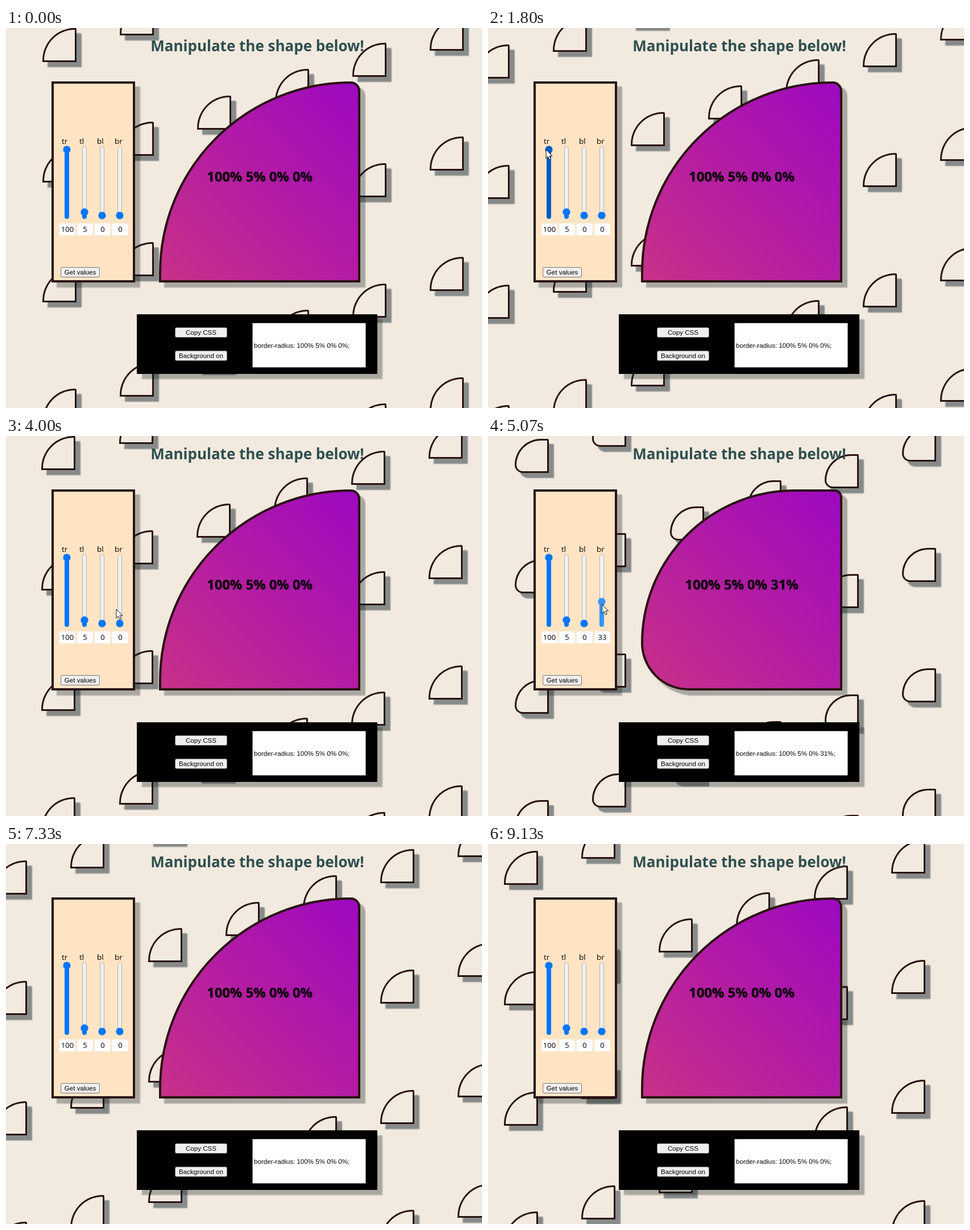
Write an HTML page that moves like this. It is 837x669 px and loops after 9.19 s.

```html
<!DOCTYPE html>
<html lang="en">
<head>
<meta charset="utf-8">
<title>Manipulate the shape below!</title>
<style>
  html, body { margin: 0; width: 100%; height: 100%; overflow: hidden; background: #f2eadf; }
  #stage { position: relative; width: 837px; height: 669px; overflow: hidden; background: #f2eadf; }
  #stage div { position: absolute; box-sizing: border-box; }
  .tile { left: 0; top: 0; width: 60px; height: 60px; border: 3px solid #2a1212;
    background: #f2eadf; box-shadow: 9px 9px 2px #868b89; }
  .box { box-shadow: 9px 9px 2px rgba(20, 25, 30, .32); }
  #panel { left: 80px; top: 94px; width: 147px; height: 354px; border: 4px solid #2a1212; background: #ffe4c4; }
  #shape { left: 269px; top: 94px; width: 354px; height: 354px; border: 4px solid #2a1212;
    background: linear-gradient(45deg, #c93187, #9d08c1) border-box; }
  #console { left: 230px; top: 504px; width: 423px; height: 105px; background: #000; }
  svg { position: absolute; left: 0; top: 0; }
  .ui { font-family: "Open Sans", "Noto Sans", sans-serif; }
  .form { font: 11.6px "Liberation Sans", Arial, sans-serif; }
  .bold { font-weight: 700; }
  .mid { text-anchor: middle; }
  #readout { text-shadow: 1px 1px 2px rgba(0, 0, 0, .35); }
</style>
</head>
<body>
<div id="stage">
  <div id="tiles"></div>
  <div id="panel" class="box"></div>
  <div id="shape" class="box"></div>
  <div id="console" class="box"></div>
  <svg id="art" width="837" height="669" viewBox="0 0 837 669"></svg>
</div>
<script>
const LOOP = 9190, FPS = 15, LAST = 137;
const COL = { x: 136.2, y: 46.4 }, ROW = 211.8;
const COLS = 7, ROWS = 5;
const BLUE = '#0075ff', HOVER = '#005cc8', ACTIVE = '#3793ff';
const PX = 1.16; // slider pixels per percent

// Each slider rests at a value; two of them are dragged away and back.
const specs = [
  { name: 'tr', rest: 100, by: -47, from: 1.8, to: 3.6 },
  { name: 'tl', rest: 5 },
  { name: 'bl', rest: 0 },
  { name: 'br', rest: 0, by: 37, from: 4.2, to: 6.4 }
];

const $ = id => document.getElementById(id);
const art = $('art');
const mod = (a, n) => (a % n + n) % n;
const unit = (t, from, to) => Math.min(1, Math.max(0, (t - from) / (to - from)));

function ease(t, from, to) {
  const u = unit(t, from, to);
  return u * u * (3 - 2 * u);
}

const offset = (s, t) => s.by ? s.by * Math.sin(Math.PI * unit(t, s.from, s.to)) ** 2 : 0;
const values = t => specs.map(s => Math.round(s.rest + offset(s, t)));

// Two columns per second, with a slight slow wobble.
const drift = t => 2 * t + .031 * Math.sin(2 * Math.PI * t * 1000 / LOOP);

function tint(s, t) {
  if (!s.by || t < s.from - .1 || t > s.to) return BLUE;
  return t > s.from + .05 ? ACTIVE : HOVER;
}

function pointer(t) {
  const enter = ease(t, 1.1, 1.7), cross = ease(t, 3.6, 4), leave = ease(t, 6.4, 7);
  const x = -20 + 122 * enter + 5 * ease(t, 1.8, 2.6) + 87 * cross + 14 * ease(t, 4.2, 6) - 240 * leave;
  const y = 300 - 86 * enter + 91 * cross + 30 * ease(t, 4, 4.2) + 65 * leave;
  const dragged = specs.reduce((sum, s) => sum + offset(s, t), 0);
  return `translate(${x} ${y - PX * dragged})`;
}

function add(tag, attrs, text) {
  const el = document.createElementNS('http://www.w3.org/2000/svg', tag);
  for (const k in attrs) el.setAttribute(k, attrs[k]);
  if (text) el.textContent = text;
  art.appendChild(el);
  return el;
}

const label = (x, y, cls, size, text, fill = '#000') =>
  add('text', { x, y, class: cls, style: size ? `font-size:${size}px` : '', fill }, text);

function button(x, y, w, text) {
  add('rect', { x: x + .5, y: y + .5, width: w - 1, height: 17, rx: 2.5, fill: '#efefef', stroke: '#767676' });
  label(x + w / 2, y + 13, 'form mid', 0, text);
}

label(442, 41, 'ui bold mid', 26, 'Manipulate the shape below!', '#2f4f4f');
const readout = label(446, 270, 'ui bold mid', 23.8, '');
readout.id = 'readout';

const sliders = specs.map(({ name }, i) => {
  const x = 107 + 31 * i;
  label(x - 9, 204, 'ui', 13.5, name);
  const rail = add('rect', { x: x - 3.5, y: 208.5, width: 7, height: 127, rx: 3.5, stroke: '#b2b2b2' });
  const bar = add('rect', { x: x - 4, width: 8, rx: 4 });
  const thumb = add('circle', { cx: x, r: 6.6 });
  add('rect', { x: x - 13, y: 344, width: 28, height: 21, fill: '#fff' });
  return { rail, bar, thumb, num: label(x + 1, 359, 'ui mid', 13, '') };
});

button(96, 421, 69, 'Get values');
button(297, 527, 92, 'Copy CSS');
button(297, 568, 92, 'Background on');
add('rect', { x: 433.5, y: 519.5, width: 199, height: 78, rx: 1, fill: '#fff', stroke: '#767676' });
const css = label(436, 563, 'form', 0, '');
const cursor = add('path', {
  d: 'M0 0V15.5L3.6 12.2L6 18L8.6 16.9L6.2 11.2H11Z', fill: '#fff', stroke: '#111'
});

const tiles = Array.from({ length: COLS * ROWS }, () => {
  const el = document.createElement('div');
  el.className = 'tile';
  $('tiles').appendChild(el);
  return el;
});

function placeTiles(phase, radius) {
  tiles.forEach((el, n) => {
    const d = Math.floor(n / ROWS) - phase % 1;
    const x = 64 + COL.x * d;
    const y = mod(-.3 - COL.y * d, ROW) + (n % ROWS - 1) * ROW;
    el.style.transform = `translate(${Math.round(x)}px, ${Math.round(y)}px)`;
    el.style.borderRadius = radius;
  });
}

function render(t) {
  // The shape and its text trail the sliders by one step.
  const radius = values(t - 1 / FPS).map(v => v + '%').join(' ');
  placeTiles(drift(t), radius);
  $('shape').style.borderRadius = radius;
  readout.textContent = radius;
  css.textContent = `border-radius: ${radius};`;

  values(t).forEach((v, i) => {
    const s = sliders[i], y = 330 - PX * v, color = tint(specs[i], t);
    s.thumb.setAttribute('cy', y);
    s.thumb.setAttribute('fill', color);
    s.bar.setAttribute('y', y);
    s.bar.setAttribute('height', 336 - y);
    s.bar.setAttribute('fill', color);
    s.rail.setAttribute('fill', color === ACTIVE ? '#f5f5f5' : '#efefef');
    s.num.textContent = v;
  });

  cursor.setAttribute('transform', pointer(t));
}

const start = performance.now();
function tick() {
  const ms = (performance.now() - start) % LOOP;
  render(Math.min(LAST, Math.floor((ms + 4) * FPS / 1000)) / FPS);
  requestAnimationFrame(tick);
}
tick();
</script>
</body>
</html>
```
